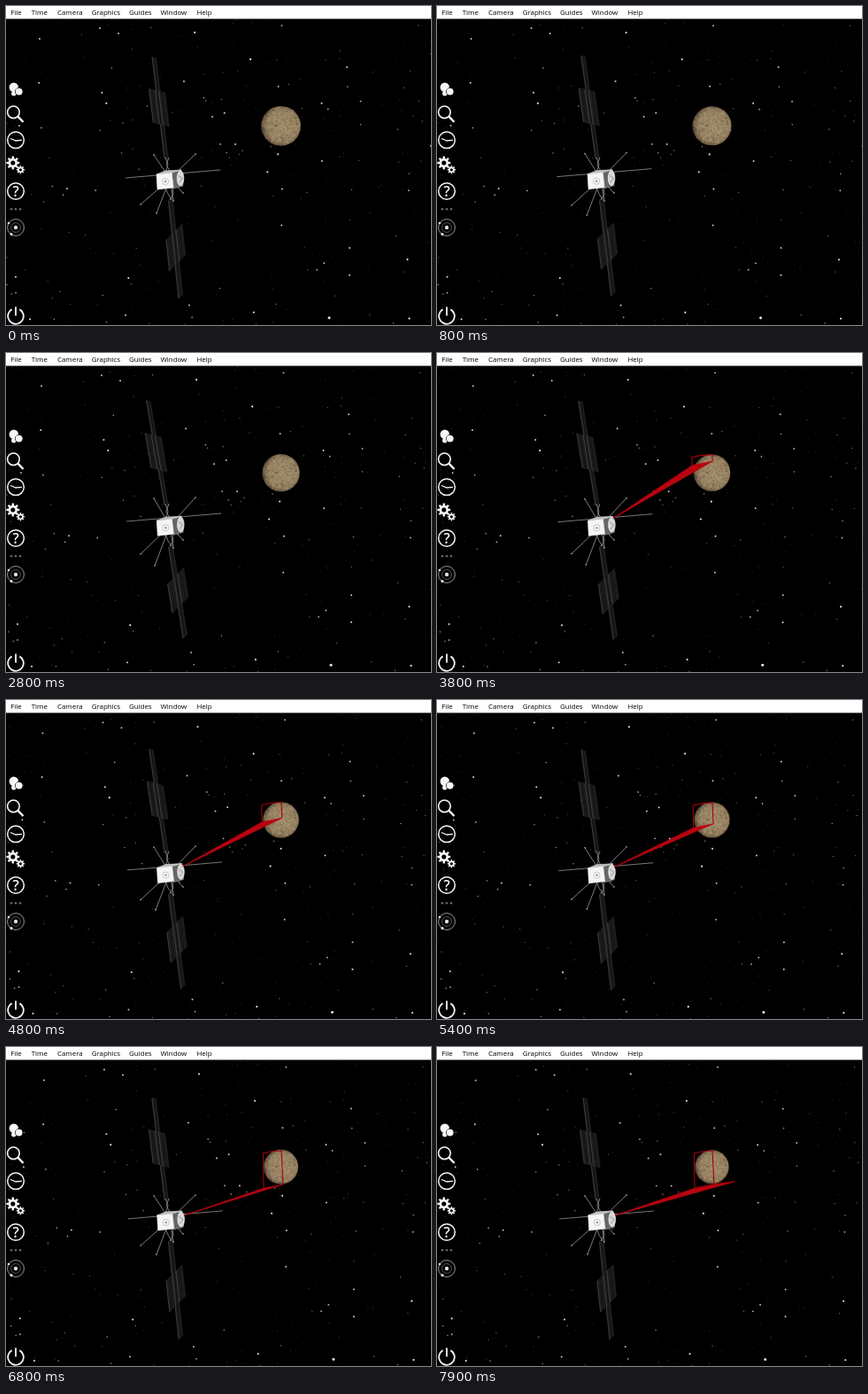
Write an HTML page with a canvas that moves like this. It is 480 px wide and 360 px high and loops after 8000 ms.

```html
<!DOCTYPE html>
<html lang="en">
<head>
<meta charset="utf-8">
<style>
html, body { margin: 0; width: 100%; height: 100%; overflow: hidden; background: #000; }
canvas { display: block; }
</style>
</head>
<body>
<canvas id="stage" width="480" height="360"></canvas>
<script>
const c = document.getElementById('stage').getContext('2d');
const TAU = Math.PI * 2;
const WHITE = '#f6f6f6';
let seed = 41;
const rnd = () => (seed = (seed * 16807) % 2147483647) / 2147483647;
const mix = (a, b, p) => a + (b - a) * p;
const clamp = p => Math.max(0, Math.min(1, p));

function path(points, closed) {
  c.beginPath();
  points.forEach(([x, y]) => c.lineTo(x, y));
  if (closed) c.closePath();
}
function poly(points, fill, stroke, width = 0.6) {
  path(points, true);
  c.fillStyle = fill;
  c.fill();
  c.strokeStyle = stroke;
  c.lineWidth = width;
  c.stroke();
}
function line(points, color, width = 0.6) {
  path(points);
  c.strokeStyle = color;
  c.lineWidth = width;
  c.stroke();
}
function disc(x, y, r, color) {
  c.beginPath();
  c.arc(x, y, r, 0, TAU);
  c.fillStyle = color;
  c.fill();
}
function ring(x, y, r, color, width, from = 0, to = TAU) {
  c.beginPath();
  c.arc(x, y, r, from, to);
  c.strokeStyle = color;
  c.lineWidth = width;
  c.stroke();
}

// A few landmark stars; the rest of the sky is scattered with mostly faint ones
const landmarks = [
  [365, 352], [38, 37], [106, 25], [127, 31], [233, 125], [259, 156], [357, 175],
  [69, 206], [388, 273], [135, 349], [385, 69], [201, 85]
];
const sky = Array.from({ length: 700 }, () => [rnd() * 492 - 8, rnd() * 360, rnd() ** 7]);
landmarks.forEach(([x, y], i) => sky.push([x, y, i ? 0.8 : 1.6]));

const spots = Array.from({ length: 420 }, () => {
  const a = rnd() * TAU, d = Math.sqrt(rnd());
  return [Math.cos(a) * d, Math.sin(a) * d, 0.02 + rnd() * 0.05, rnd() < 0.55];
});

function stars(t) {
  for (const [x, y, m] of sky)
    disc(x + t * 0.00072, y + t * 0.00008, 0.45 + m * 0.65, `rgba(235,235,235,${0.22 + m * 0.8})`);
}

function planet(t) {
  const r = 22.4 * Math.exp(-t * 2e-5);
  c.save();
  c.translate(310.5, 135.3);
  c.scale(r, r);
  const g = c.createRadialGradient(0.15, 0, 0.1, 0.08, 0, 1.08);
  g.addColorStop(0, '#a38e6b');
  g.addColorStop(0.75, '#917d5e');
  g.addColorStop(1, '#4a3d2f');
  disc(0, 0, 1, g);
  c.clip();
  for (const [x, y, s, light] of spots)
    disc(x, y, s, light ? 'rgba(195,175,138,.17)' : 'rgba(80,64,46,.2)');
  c.restore();
}

// The scan runs down the left half of the planet, then sweeps right
function beam(t) {
  if (t < 3000) return;
  const down = clamp((t - 3000) / 3800), sweep = clamp((t - 6800) / 1100);
  const x = mix(310.5, 313, down), y = mix(113.5, 155, down);
  const left = mix(287.5, 291, down), top = mix(114, 117, down), low = y + 4.5;
  const start = [mix(198, 201, down), mix(186, 190, down)];
  const edge = [[left, low], [x, y]];
  line([[left, low], [left - 0.5, top + 3], [left + 9, top + 1], [311, top], [x, y]], '#a8000c', 1.1);
  if (sweep) edge.push([x + 23 * sweep, y - 3 * sweep]);
  poly([start, ...edge], '#b80410', '#b80410', 0.8);
  if (sweep) line(edge, '#98000a', 1.6);
}

// Solar wing: u runs from base to tip, v crosses it; slope skews the cross direction
function wing(base, tip, slope, inner, outer, shift) {
  const at = (u, v) => [mix(base[0], tip[0], u) + v, mix(base[1], tip[1], u) + v * slope];
  const panel = (u0, u1, v0, v1) => {
    const m = (v0 + v1) / 2;
    poly([at(u0, v0), at(u0, v1), at(u1, v1), at(u1, v0)], '#1d1b1a', '#2e2c2b', 0.5);
    line([at(u0, m), at(u1, m)], '#0c0c0c', 0.6);
    line([at(u0, v0), at(u1, v0)], '#505050', 0.6);
  };
  panel(0, inner, -2, 2.5);
  panel(outer, 1, -2, 2.5);
  for (const v of [-9, -2, 2]) panel(inner, outer, v + shift, v + shift + (v === -2 ? 4 : 7));
}

function swing(t) {
  if (t < 2800) return Math.sin(t / 2800 * Math.PI / 2) ** 1.3;
  return (1 + Math.cos(Math.min(1, (t - 2800) / 4600) ** 0.85 * Math.PI)) / 2;
}

function craft(t) {
  const k = swing(t), dx = t * 0.0004;
  wing([181, 173 - k], [167 - 6.5 * k, 58 - 4 * k], 0.25, 0.34, 0.67, -1);
  wing([185.5, 218 - k], [197 + 5 * k, 328 - 8 * k], -1, 0.34, 0.66, 0.5);

  // Struts joining the body to each wing
  for (const side of [-1, 1]) {
    line([[182 + side * 2, 171 - k], [182 - side, 179], [183 + side * 3, 188]], '#999', 0.8);
    line([[184 - side * 4, 205], [186 - side * 3, 212], [186 + side, 219 - k]], '#999', 0.8);
  }

  line([[135 + dx, 194 - 4 * k], [242 + dx, 185 - 4 * k]], '#aaa', 0.7);
  const rods = [[167, 168, -4], [214, 167, -4], [152, 224, 3], [170 - 2 * k, 234, 6], [189, 220, 0], [200, 211, 0]];
  for (const [x, y, lift] of rods) {
    const end = y + lift * k;
    line([[x, end], [185, 195]], '#c0c0c0', 0.65);
    disc(x, end, 0.7, '#ddd');
  }

  c.save();
  c.translate(dx / 4, -k * 0.8);
  poly([[187, 188], [198, 185], [200, 203], [189, 206]], '#666', '#999');
  poly([[170, 190], [187, 188], [189, 205], [171, 207]], '#f5f5f5', '#fff');
  poly([[170, 190], [180, 186], [198, 185], [187, 188]], '#bbb', '#ddd');
  ring(180, 198, 3.6, '#b5b5b5', 0.7);
  disc(180, 198, 1.2, '#999');
  c.translate(197, 194.5);
  c.scale(0.45, 1);
  disc(0, 0, 8.4, '#d8d8d8');
  ring(0, 0, 8.4, '#f4f4f4', 1);
  line([[-5, -3], [5, 0], [-3, 5]], '#777', 1);
  c.restore();
}

function gear(x, y, r) {
  for (let a = 0; a < TAU; a += TAU / 8)
    line([[x, y], [x + Math.cos(a) * r * 1.4, y + Math.sin(a) * r * 1.4]], WHITE, r * 0.45);
  disc(x, y, r, WHITE);
  disc(x, y, r * 0.48, '#000');
}

function icons() {
  disc(8.8, 91.8, 5.2, WHITE);
  disc(8.8, 98.8, 2.7, WHITE);
  ring(14.7, 96.6, 4.2, '#000', 0.9);
  disc(14.7, 96.6, 3.9, WHITE);

  ring(8.4, 119.8, 6.8, WHITE, 1.6);
  line([[13.3, 124.7], [19.5, 131]], WHITE, 2.4);

  ring(11, 151.3, 9.3, WHITE, 1.5);
  line([[5, 149.5], [11, 152], [18, 151.3]], WHITE, 1.3);

  gear(7.8, 177, 5.3);
  gear(16.4, 184.8, 3.3);

  ring(11, 209, 9.3, WHITE, 1.5);
  c.fillStyle = WHITE;
  c.textAlign = 'center';
  c.font = '600 16px "Open Sans", sans-serif';
  c.fillText('?', 11, 214.8);

  for (const x of [6, 11, 16]) disc(x, 229.3, 1.3, '#686868');
  ring(11, 250, 9.4, '#aaa', 0.9);
  ring(11, 250, 5.4, '#777', 0.7);
  disc(11, 250, 2.2, '#e0e0e0');
  disc(3, 245, 1.3, WHITE);
  disc(6, 257.5, 1.5, WHITE);

  ring(11, 350, 8.8, WHITE, 1.8, -1.05, 4.19);
  line([[11, 339.5], [11, 349.5]], WHITE, 1.8);
}

function menu() {
  c.fillStyle = '#fff';
  c.fillRect(0, 0, 480, 14.5);
  c.fillStyle = '#000';
  c.textAlign = 'left';
  c.font = '500 7.9px "Open Sans", "Noto Sans", sans-serif';
  const items = { File: 5.3, Time: 28.7, Camera: 58, Graphics: 96.7, Guides: 139, Window: 174.5, Help: 215.5 };
  for (const name in items) c.fillText(name, items[name], 10.2);
}

function draw(now) {
  const t = Math.floor(now % 8000 / 100) * 100;
  c.fillStyle = '#000';
  c.fillRect(0, 0, 480, 360);
  stars(t);
  planet(t);
  craft(t);
  beam(t);
  icons();
  menu();
  requestAnimationFrame(draw);
}
draw(0);
</script>
</body>
</html>
```
